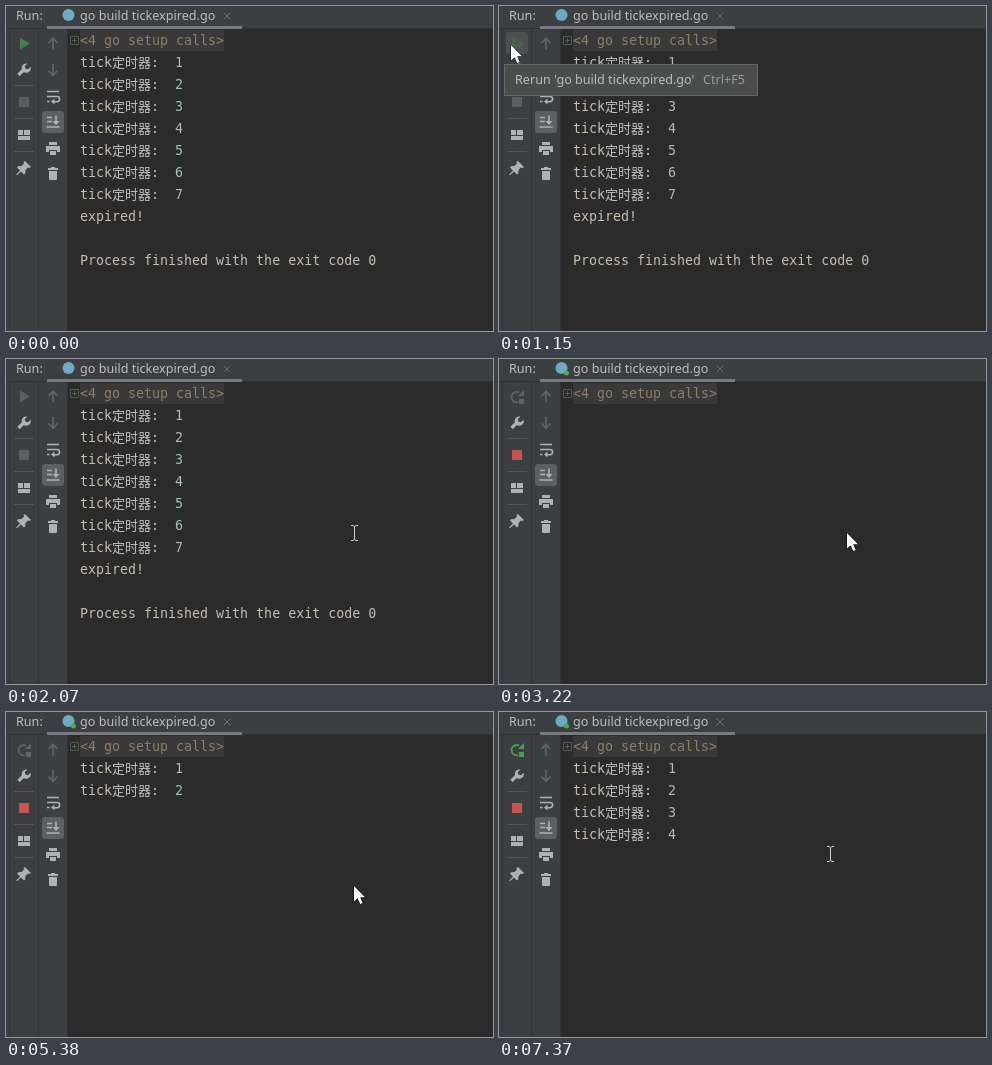
Write an HTML page that moves like this. It is 487x325 px and loops after 8 s.

```html
<!DOCTYPE html>
<html>
<head>
<meta charset="utf-8">
<style>
html, body { margin: 0; width: 100%; height: 100%; overflow: hidden; background: #3c3f41; }
svg { display: block; width: 487px; height: 325px; }
text { white-space: pre; }
.ui { font: 12.6px "Noto Sans", sans-serif; fill: #bbbdbf; }
.code { font: 13.3px "DejaVu Sans Mono", monospace; fill: #c6bdb0; }
.cjk { font: 13px "Noto Sans CJK SC", "Noto Sans CJK", sans-serif; fill: #bfbfbf; }
.digit { fill: #a9bcc4; }
.icon { fill: #afb1b3; }
.line { fill: none; stroke: #afb1b3; stroke-width: 1.6; }
.off { fill: none; stroke: #626567; stroke-width: 1.7; }
</style>
</head>
<body>
<svg viewBox="0 0 487 325">
  <!-- panels -->
  <rect width="487" height="325" fill="#3c3f41"/>
  <rect y="22" width="487" height="1" fill="#323232"/>
  <path d="M3.5 23V325M32.5 23V325M61.5 23V325" stroke="#323537"/>
  <rect x="62" y="23" width="425" height="302" fill="#2b2b2b"/>
  <path d="M8 79.5H28M8 112.5H28M8 145.5H28" stroke="#545759"/>

  <!-- header -->
  <text class="ui" x="10" y="14">Run:</text>
  <rect x="41" y="20" width="195" height="3" fill="#747a80"/>
  <circle cx="62.5" cy="9" r="6" fill="#6fa9c4"/>
  <circle id="runDot" cx="67.5" cy="14" r="2.5" fill="#4fae4b"/>
  <text class="ui" x="74" y="14">go build tickexpired.go</text>
  <path d="M217.5 6.5l7 7m0-7l-7 7" stroke="#6c7072"/>

  <!-- run toolbar -->
  <rect id="hover" x="7" y="26" width="22" height="22" rx="3" fill="#4c5052"/>
  <path id="play" d="M14 31.5L24 37.5L14 43.5Z"/>
  <g id="rerun">
    <path d="M19 43.2A5.2 5.2 0 1 1 20 33.5" fill="none" stroke="currentColor" stroke-width="1.9"/>
    <path d="M19 37H25V31Z" fill="currentColor"/>
    <rect x="20" y="40" width="5" height="5" fill="currentColor"/>
  </g>
  <path d="M12.5 69L19 62.5" stroke="#afb1b3" stroke-width="3.2"/>
  <path d="M20.5 57.500a4.6 4.6 0 1 0 4.3 5.2l-.1-1.9-2.8 2.4-2.6-.7-.5-2.5 2.6-2.3z" class="icon"/>
  <rect id="stop" x="13" y="91" width="10" height="10"/>
  <path d="M12 124h5v5h-5zM18 124h6v5h-6zM12 130h12v4h-12z" class="icon"/>
  <path d="M19 155l6 6-1.500 1-1.500-.5-2.500 2.500-.3 3.500-1.200 1-3-3-4 3.800-.8-.8 3.800-4-3-3 1-1.200 3.500-.3 2.500-2.500-.5-1.500z" class="icon"/>

  <!-- console toolbar -->
  <path class="off" d="M47 43.500V32.500M42.500 37L47 32.300L51.500 37"/>
  <path class="off" d="M47 58V69M42.500 64.500L47 69.200L51.500 64.500"/>
  <path class="line" d="M41 85.500H53M41 90.500H51a2.600 2.600 0 0 1 0 5.200H47M41 95.500H43.500"/>
  <path class="icon" d="M45 95.500l3.500-3v6z"/>
  <rect x="36" y="105" width="22" height="22" rx="3" fill="#5b6063"/>
  <path class="line" d="M41 111.500H46M41 115.500H46M40.500 121H53.500M50 109.500V117"/>
  <path class="icon" d="M46.500 115h7L50 119z"/>
  <path class="icon" d="M43 136h8v3h-8zM40 140h14v6h-3v-2h-8v2h-3zM44 145h6v4h-6z"/>
  <path class="icon" d="M42 162h3v-1h4v1h3v2h-10zM43 165h8v8q0 1-1 1h-6q-1 0-1-1z"/>

  <!-- console -->
  <rect x="74" y="24" width="144" height="21" fill="#393939"/>
  <path d="M64.500 30.500h8v8h-8zM66 34.500h5M68.500 32v5" fill="none" stroke="#4f5d50"/>
  <text class="code" x="74" y="39" style="fill:#8e7e69">&lt;4 go setup calls&gt;</text>
  <g id="ticks"></g>
  <g id="ending">
    <text class="code" x="74" y="215">expired!</text>
    <text class="code" x="74" y="259">Process finished with the exit code 0</text>
  </g>

  <g id="tooltip">
    <rect x="5.500" y="58.500" width="253" height="31" fill="#4b4d4d" stroke="#66696b"/>
    <text class="ui" x="16" y="78">Rerun 'go build tickexpired.go'</text>
    <text class="ui" x="204" y="78" style="fill:#999b9c">Ctrl+F5</text>
  </g>

  <path id="arrow" d="M0 0V15.500L3.600 12.200L6.200 18L8.700 16.900L6.200 11.200H11Z" fill="#fff" stroke="#000" paint-order="stroke"/>
  <path id="beam" d="M-3 -7.500H-1L.5 -6.500L2 -7.500H4M.5 -6.500V6.500M-3 7.500H-1L.5 6.500L2 7.500H4" fill="none" stroke="#d0d0d0"/>
</svg>
<script>
const LOOP = 8000;
const $ = id => document.getElementById(id);
const show = (id, on) => $(id).setAttribute('visibility', on ? 'visible' : 'hidden');

for (let n = 1; n <= 7; n++) {
  const y = 39 + 22 * n;
  $('ticks').innerHTML += `<g><text class="code" x="74" y="${y}">tick</text>` +
    `<text class="cjk" x="106" y="${y}">定时器</text><text class="code" x="145" y="${y}">:</text>` +
    `<text class="code digit" x="169" y="${y}">${n}</text></g>`;
}
const ticks = [...$('ticks').children];
const tickTimes = [4390, 5380, 6370, 7370];

// Pointer moves: first and last step time, number of steps, start, end.
const moves = [
  [70, 690, 9, [420, 312], [12, 39]],
  [1280, 1280, 1, [12, 39], [12, 37]],
  [1530, 2070, 7, [12, 37], [348, 174]],
  [6170, 6300, 3, [348, 174], [334, 183]],
  [6570, 6910, 6, [334, 183], [331, 142]]
];

function pointerAt(t) {
  const move = moves.filter(m => t >= m[0]).pop();
  if (!move) return null;
  const [start, end, steps, from, to] = move;
  const step = end > start ? Math.floor((t - start) / (end - start) * (steps - 1) + 1e-6) : 0;
  const p = Math.min(1, (step + 1) / steps);
  const eased = p * p * (3 - 2 * p);
  return from.map((v, i) => Math.round(v + (to[i] - v) * eased));
}

function draw(t) {
  const cleared = t >= 3150, running = t >= 3220;
  const hovered = t >= 690 && t < 1530;

  const shown = cleared ? tickTimes.filter(at => t >= at).length : 7;
  ticks.forEach((line, i) => line.setAttribute('visibility', i < shown ? 'visible' : 'hidden'));
  show('ending', !cleared);
  show('tooltip', t >= 1150 && t < 1280);
  show('hover', hovered);
  show('runDot', running);

  show('play', !running);
  $('play').setAttribute('fill', hovered ? '#465d4a' : t < 1530 ? '#437e4c' : '#5d6062');
  $('play').setAttribute('stroke', hovered ? '#3f7548' : 'none');
  show('rerun', running);
  $('rerun').setAttribute('color', t >= 6570 ? '#4a9d55' : '#606365');
  $('stop').setAttribute('fill', running ? '#c75450' : '#5c5f61');

  const pos = pointerAt(t);
  const isArrow = pos && (pos[0] < 62 || running && t < 6170);
  show('arrow', isArrow);
  show('beam', pos && !isArrow);
  if (pos) {
    $('arrow').setAttribute('transform', `translate(${pos})`);
    $('beam').setAttribute('transform', `translate(${pos})`);
  }
}

const startTime = performance.now();
function frame() {
  draw((performance.now() - startTime) % LOOP);
  requestAnimationFrame(frame);
}
frame();
</script>
</body>
</html>
```
